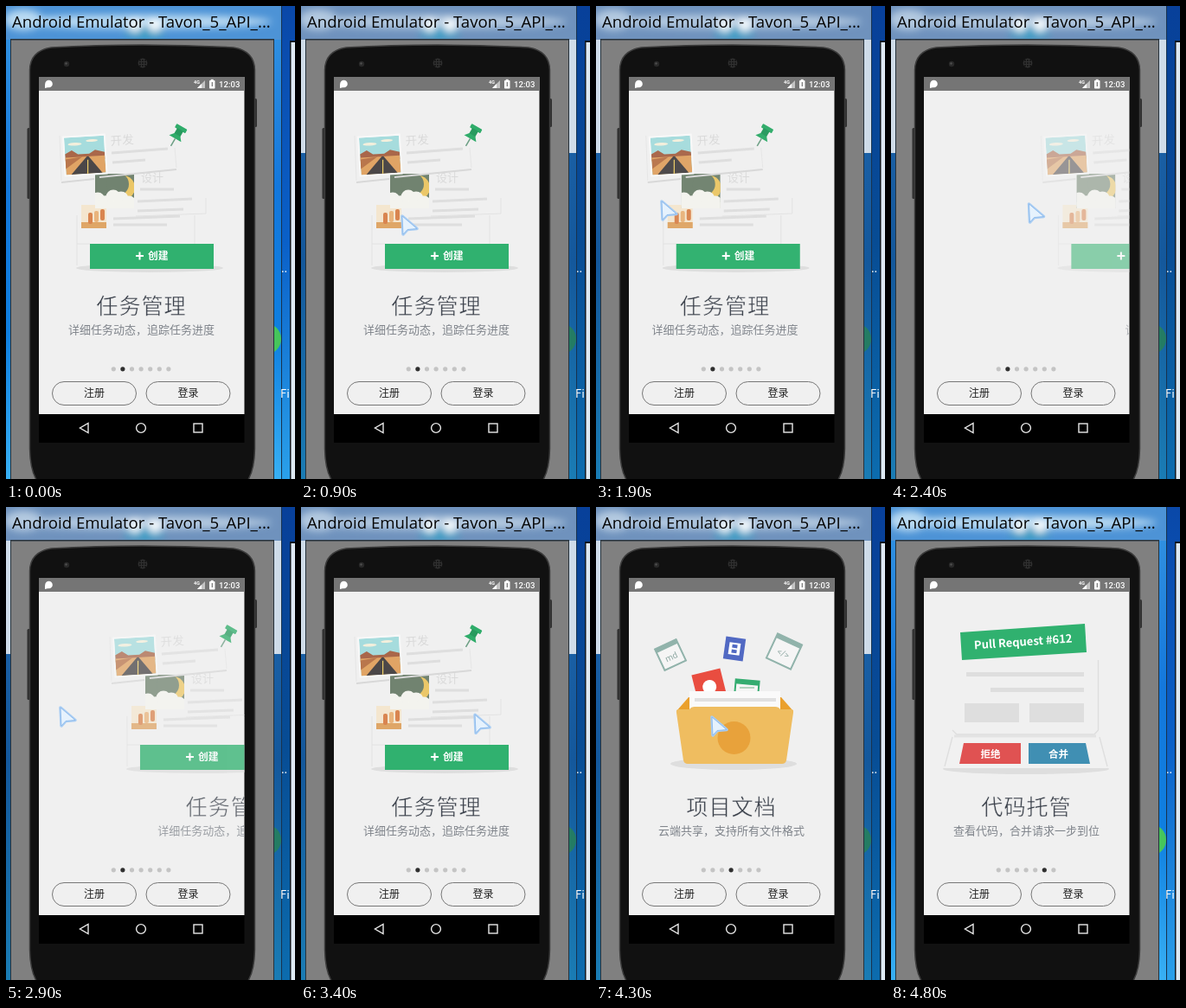
An HTML page for the animation above (5400 ms loop, 334x547 px).

```html
<!DOCTYPE html>
<html lang="zh-CN">
<head>
<meta charset="utf-8">
<title>Emulator onboarding</title>
<style>
html, body { margin: 0; width: 100%; height: 100%; overflow: hidden; background: #0b57a8; }
svg { display: block; width: 334px; height: 547px; }
text { font-family: "Noto Sans CJK SC", "Noto Sans CJK", "Noto Sans", sans-serif; }
.bar { font: 18.6px "Open Sans", sans-serif; }
.ui { font-family: Roboto, sans-serif; }
.title { font-size: 25.2px; letter-spacing: .9px; fill: #3c424c; stroke: #f0f0f0; stroke-width: .5px; }
.sub { font-size: 13px; fill: #7f848b; }
.mid { text-anchor: middle; }
.strong { font-weight: 700; fill: #fff; }
</style>
</head>
<body>
<svg id="stage" viewBox="0 0 334 547" xmlns="http://www.w3.org/2000/svg"></svg>
<script>
const LOOP = 5400, STEP = 100, WIDTH = 238, TEXT_SHIFT = 424;
const PAPER = '#f0f0f0', LINE = '#dedede', GREEN = '#30b16f';

// markup helpers
const rect = (x, y, w, h, fill, more = '') => `<rect x="${x}" y="${y}" width="${w}" height="${h}" fill="${fill}" ${more}/>`;
const circle = (x, y, r, fill, more = '') => `<circle cx="${x}" cy="${y}" r="${r}" fill="${fill}" ${more}/>`;
const oval = (x, y, rx, ry, fill, more = '') => `<ellipse cx="${x}" cy="${y}" rx="${rx}" ry="${ry}" fill="${fill}" ${more}/>`;
const poly = (pts, fill, more = '') => `<polygon points="${pts}" fill="${fill}" ${more}/>`;
const shape = (d, fill) => `<path d="${d}" fill="${fill}"/>`;
const line = (d, stroke, w = 1) => `<path d="${d}" stroke="${stroke}" stroke-width="${w}" fill="none"/>`;
const text = (x, y, s, more) => `<text x="${x}" y="${y}" ${more}>${s}</text>`;
const place = (x, y, turn, body) => `<g transform="translate(${x} ${y}) rotate(${turn})">${body}</g>`;
const each = (list, draw) => list.map(draw).join('');
const clip = (id, w, h, body) => `<clipPath id="${id}"><rect width="${w}" height="${h}"/></clipPath><g clip-path="url(#${id})">${body}</g>`;
const fade = (id, ...colors) => `<linearGradient id="${id}" x2="0" y2="1">` +
  each(colors, (c, i) => `<stop offset="${i / (colors.length - 1)}" stop-color="${c}"/>`) + '</linearGradient>';

const defs = `<defs>
  ${fade('sideLit', '#2f8fe0', '#1478dc', '#0f7fe0', '#38b0f4')}
  ${fade('sideDim', '#1f66ad', '#14589c', '#1a7cb4')}
  ${fade('backLit', '#0a48a8', '#0a60c8', '#2aa0ea')}
  ${fade('backDim', '#08409a', '#074c94', '#0c6cae')}
  <filter id="soft" x="-20%" y="-100%" width="140%" height="300%"><feGaussianBlur stdDeviation="4"/></filter>
  <clipPath id="screen"><rect x="38" y="98" width="237.5" height="374"/></clipPath>
</defs>`;

function desktop(mode, base, haze, disc) {
  const glow = oval(157, 18, 150, 8, haze) + oval(20, 16, 22, 12, haze) +
    oval(160, 31, 24, 8, '#3b9cc4') + each([149, 172], x => circle(x, 22, 8, '#f2f8fb'));
  return `<g id="wall${mode}">` +
    rect(0, 0, 334, 547, `url(#back${mode})`) + rect(0, 39, 318, 508, `url(#side${mode})`) +
    (mode === 'Dim' ? rect(0, 39, 318, 131, '#cfdce9') : '') +
    circle(300, 385, 18, disc) + rect(0, 0, 318, 39, base) + `<g filter="url(#soft)">${glow}</g></g>`;
}

function frame() {
  return line('M318.5 0V547', '#17324e') + rect(328, 40, 6, 507, '#101820') + rect(329.5, 42, 4.5, 505, '#dfeaf3') +
    text(317, 453, 'Fi', 'font-size="13" fill="#fff"') + text(318, 308, '..', 'font-size="13" fill="#fff"') +
    text(7, 25, 'Android Emulator - Tavon_5_API_...', 'class="bar" fill="#050505"') +
    rect(5, 38, 305, 509, '#26323c') + rect(6, 39.5, 303, 508, '#808080');
}

function phone() {
  const grid = [-3, 0, 3], body = 'M27.5 512V74Q28 52 52 48Q104 45 157.500 45Q211 45 263 48Q287 52 287.500 74V512Q287 540 277 552H38Q28 540 27.500 512Z';
  const hollow = 'none" stroke="#e8e8e8" stroke-width="1.4';
  return rect(24.5, 141, 4, 82, '#303030', 'rx="1.5"') + rect(286, 107, 4, 33, '#303030', 'rx="1.5"') +
    shape(body, '#111') + line(body, '#3c3c3c', 1.5) +
    circle(70, 67, 3.2, '#292929') + circle(69.5, 66.5, 1.2, '#505050') + circle(158, 66, 5.4, '#303030') +
    each(grid, dx => each(grid, dy => circle(158 + dx, 66 + dy, .9, '#111'))) +
    rect(38, 82, 237.5, 423, '#000') + rect(38, 82, 237.5, 390, PAPER) + rect(38, 82, 237.5, 16, '#757575') +
    circle(49.5, 90, 4.3, '#fff') + poly('45,90 49,94 45,95', '#fff') +
    text(217, 90, '4G', 'class="ui strong" font-size="5.5"') +
    poly('221,95 230,95 230,86', '#c3c3c3') + poly('221,95 226,95 226,90', '#fff') +
    rect(235, 86, 6.5, 9.5, '#fff', 'rx=".8"') + rect(236.7, 84.8, 3, 2, '#fff') + rect(237.7, 88, 1.2, 5, '#757575') +
    text(246, 94, '12:03', 'class="ui" font-size="9.6" font-weight="500" fill="#fff"') +
    poly('95,482.5 95,493.5 85.5,488', hollow) + circle(156, 488, 5.4, hollow) + rect(217, 483, 10, 10, hollow);
}

function controls() {
  const pill = (x, s) => rect(x, 434.5, 97, 27, PAPER, 'rx="13.5" stroke="#777"') +
    text(x + 48.5, 452.3, s, 'class="mid" font-size="12" fill="#222"');
  return each([...Array(7).keys()], i => circle(124.3 + 10.6 * i, 419.8, 2.6, '#c4c4c4', 'class="dot"')) +
    pill(53.5, '注册') + pill(162, '登录');
}

function avatar(x, y, scale) {
  return `<g transform="translate(${x} ${y}) scale(${scale})">` + circle(0, 0, 11, '#49aada') +
    shape('M-7 8Q-4 5 0 5Q4 5 7 8Q0 14 -7 8Z', '#f6f6f6') + oval(0, 1, 6, 7, '#f5d9bf') +
    shape('M-7 0Q-9 -9 0 -9Q9 -9 7 0Q5 -4 1 -4Q-5 -3 -7 0Z', '#17222b') +
    each([-3, 3], dx => circle(dx, 1.3, 2.3, '#fff', 'stroke="#1b242b" stroke-width="1.1"')) + line('M-1.5 5.5H1.5', '#b46b55', .8) + '</g>';
}

const ground = (x, y, rx, ry) => oval(x, y, rx, ry, LINE);

function tasks() {
  const road = rect(0, 0, 46, 43, '#a6dcdd') + oval(12, 8, 8, 1.8, '#f3efdc') + oval(32, 5, 7, 1.5, '#f3efdc') +
    poly('0,19 8,15 15,20 28,20 35,16 46,19 46,27 0,27', '#a9674a') + rect(0, 23, 46, 20, '#e0a465') +
    poly('0,25 20,23 0,36', '#b9764c') + poly('25,23 27,23 42,43 6,43', '#4b4748') + line('M26 27L25 43', '#f0cf68', 1.2);
  const night = rect(0, 0, 45, 40, '#718370') + circle(32, 16, 14, '#ebc768') + circle(26, 12, 13, '#718370') +
    each([0, 1, 2, 3, 4], i => circle(3 + 9 * i, 30 + 4 * Math.sin(i * 2), 8.5, '#f3f3ee')) + rect(0, 33, 45, 7, '#f3f3ee');
  const autumn = rect(0, 0, 29, 27, '#f4e6cf') + rect(0, 20, 29, 7, '#dfa667') +
    each([0, 1, 2], i => rect(8 + 7 * i, 9 - i * 2, 5, 13, i % 2 ? '#e9b47c' : '#d98550', 'rx="2"'));
  const pin = rect(-7, -11, 14, 5, '#2fac6a', 'rx="1"') + rect(-4, -7, 8, 9, '#279a5e') + poly('-4,0 4,0 8,5 -8,5', '#2fac6a') + line('M0 5V15', '#6b9e83', 1.5);
  return ground(166, 303, 85, 5) + line('M82 242V300M82 275H97M218 242V275M231 222V240L150 243', '#e2e2e2') +
    place(87, 230, 0, autumn) + line('M124 246L201 243M124 253H186', LINE, 3) +
    place(103, 194, 0, clip('night', 45, 40, night)) + text(156, 203, '设计', 'font-size="13" fill="#dadada"') +
    line('M155 212H194M152 226L215 223M152 237L205 235', LINE, 3) +
    line('M62 150L64 202M195 164L197 187', '#e6e6e6') + line('M64 204L102 200M108 198L197 189', '#d8d8d8', 2) +
    place(67, 152.5, -3.5, rect(-2, -2, 50, 47, '#f8f8f8') + clip('photo', 46, 43, road)) +
    place(121, 161, -4, text(0, 0, '开发', 'font-size="13.5" fill="#d9d9d9"')) +
    line('M122 170L187 165M123 181L161 178', LINE, 3) + place(198, 149, 30, pin) +
    rect(97, 275, 143, 29, GREEN) + line('M150 289H159M154.5 284.5V293.5', '#fff', 2) +
    text(164, 293.4, '创建', 'class="strong" font-size="11.8"');
}

function detail() {
  const bar = (y, h) => rect(106, y, 121, h, LINE);
  return ground(156.5, 305, 94, 6) + rect(74, 171, 165, 133, PAPER) +
    line('M239 176V304', LINE) + line('M88 177V305', '#d4d4d4', 1.5) +
    rect(72, 133, 166, 38, GREEN) + rect(81.2, 145.5, 13.5, 13, 'none', 'rx="2.5" stroke="#fff" stroke-width="1.8"') +
    avatar(113, 152, 1) + text(129.5, 157, '!!!', 'class="ui strong" font-size="15" letter-spacing=".5"') +
    rect(152, 148, 76, 8, '#b9e4cd') + bar(192, 7) + bar(221, 7) + bar(244, 21) + poly('102,254 106,249 106,259', LINE) + bar(281, 6) +
    each(['#cbcbcb', '#e3bd5c', PAPER, '#d76463'], (c, i) => circle(88, 194.5 + 29.8 * i, 9.6, c)) +
    line('M83.5 195H92.5M88 190.5V199.5', '#f3f3f3', 2.3) +
    rect(84, 219.5, 8, 7.5, '#fff4d9', 'rx="1"') + rect(85.5, 222.5, 5, 3, '#e3bd5c') +
    avatar(88, 254, .86) + rect(86.8, 279.5, 2.4, 5.5, '#fff') + circle(88, 287.5, 1.3, '#fff');
}

function files() {
  const sheet = (x, y, turn, size, color, label) => {
    const h = size / 2;
    return place(x, y, turn, rect(-h, -h, size, size, '#f5f5f5', `stroke="${color}" stroke-width="2"`) + rect(-h, -h, size, 5, color) +
      text(0, 6, label, 'class="mid ui" font-size="10" fill="#91aaa5"'));
  };
  const film = rect(-11.5, -13, 23, 26, '#5169c3') + rect(-6.5, -7, 13, 14, '#fff') + each([-5, 1], y => rect(-3, y, 6, 4, '#5169c3'));
  return ground(159, 297, 73, 7) + sheet(86, 171, -25, 27, '#91b3ab', 'md') + sheet(217.5, 167, 25, 31, '#91b3ab', '&lt;/&gt;') +
    place(160, 164, 8, film) + place(131, 207, -14, rect(-17, -17, 34, 38, '#e94d40') + circle(0, 1, 8, '#fff')) +
    sheet(174, 214, 5, 27, '#34ac70', '') + line('M166 209H183', '#9bc9ae', 1.5) +
    poly('93,236 107,220 214,220 228,236 214,243 107,243', '#eaa02d') + rect(108, 213, 105, 22, '#fafafa') + rect(114, 221, 94, 4, '#e0e0e0') +
    shape('M95 234H108Q110 231 114 231H207Q211 231 213 234H226Q228.5 234 228 238L220 293Q219 297 215 297H106Q102 297 101 293L93 238Q92.5 234 95 234Z', '#efbd60') +
    circle(159.5, 267, 19, '#e8a23b');
}

function review() {
  const label = (x, y, turn, size, s) => place(x, y, turn, text(0, 0, s, `class="mid strong" font-size="${size}"`));
  return ground(156, 303, 96, 6) + poly('73,264 239,264 250,302 62,302', '#f1f1f1') +
    line('M239.5 177V258L235 263H76L71 258M71 266L62 300M241 266L250 300', LINE, 1.3) + line('M73 265H237', '#e3e3e3', 3) +
    poly('80,145 224,135 226,168 82,177', GREEN) + label(153, 160.5, -4, 13, 'Pull Request #612') +
    rect(87, 191, 136, 5, LINE) + rect(115, 209, 108, 5, LINE) + each([85, 160], x => rect(x, 227, 63, 22, LINE)) +
    poly('84,273 150,273 150,297 79,297', '#e05252') + poly('159,273 225,273 230,297 159,297', '#408fb3') +
    label(115, 289.5, 0, 11.5, '拒绝') + label(193.5, 289.5, 0, 11.5, '合并');
}

const pages = [
  [1, tasks, '任务管理', '详细任务动态，追踪任务进度'],
  [2, detail, '任务管理', '详细任务动态，追踪任务进度'],
  [3, files, '项目文档', '云端共享，支持所有文件格式'],
  [5, review, '代码托管', '查看代码，合并请求一步到位']
];
const arrow = 'M0 0L1 21L6 15.5L17 14.5Z';
const cursor = `<g id="cursor" stroke-linejoin="round"><path d="${arrow}" fill="#d9eafa" stroke="#a9cdf3" stroke-width="3.5"/>` +
  `<path d="${arrow}" fill="#e6f2fd" stroke="#86b5ea" stroke-width=".8"/></g>`;

document.getElementById('stage').innerHTML = defs +
  desktop('Lit', '#4d93d6', '#b9daf2', '#46c55b') + desktop('Dim', '#6f92bd', '#b3c9e0', '#247c63') + frame() + phone() +
  '<g clip-path="url(#screen)">' + each(pages, ([n, draw, title, sub]) =>
    `<g id="page${n}"><g class="art">${draw()}</g><g class="words">${text(156.5, 356, title, 'class="title mid"') + text(156.5, 379, sub, 'class="sub mid"')}</g></g>`) +
  '</g>' + controls() + cursor;

// each swipe: start, end, page reached
const swipes = [[1000, 1500, 2], [1500, 2000, 1], [2000, 2600, .5], [2800, 3200, 1], [3400, 3800, 2], [3900, 4300, 3], [4400, 4800, 5]];
// pointer rests: time, x, y
const rests = [[100, 328, 530], [900, 117, 243], [1900, 76, 226], [2900, 63, 232], [3800, 152, 247], [4300, 134, 243], [4800, 340, 540]];

const clamp = u => Math.max(0, Math.min(1, u));
const settle = u => 1 - Math.pow(1 - u, 2.5);

const pageAt = t => swipes.reduce((pos, [from, to, goal]) => pos + (goal - pos) * settle(clamp((t - from) / (to - from))), 1);

// between drags the pointer swings out to the right and back
function pointerAt(t) {
  const i = Math.max(1, rests.findIndex(r => r[0] > t));
  const [t0, x0, y0] = rests[i - 1], [t1, x1, y1] = rests[i];
  const u = clamp((t - t0) / (t1 - t0));
  const swing = t > 900 && t < 4300 ? 90 * Math.sin(Math.PI * u) : 0;
  return [x0 + (x1 - x0) * u + swing, y0 + (y1 - y0) * u];
}

const $ = id => document.getElementById(id);
const show = (el, on) => el.setAttribute('visibility', on ? 'visible' : 'hidden');
const move = (el, x, y = 0) => el.setAttribute('transform', `translate(${x} ${y})`);
const dots = document.querySelectorAll('.dot');
const views = pages.map(([n]) => ({ n, el: $('page' + n) }));

function render(ms) {
  const t = Math.floor(ms % LOOP / STEP) * STEP;
  const pos = pageAt(t);
  for (const { n, el } of views) {
    const d = n - pos, alpha = clamp(1 - Math.abs(d));
    show(el, alpha > 0);
    el.setAttribute('opacity', alpha);
    move(el.querySelector('.art'), d * WIDTH);
    move(el.querySelector('.words'), d * TEXT_SHIFT);
  }
  dots.forEach((dot, i) => dot.setAttribute('fill', i === Math.round(pos) ? '#2f2f2f' : '#c4c4c4'));
  show($('wallDim'), t >= 900 && t < 4700);
  show($('cursor'), t >= 100 && t < 4800);
  move($('cursor'), ...pointerAt(t));
}

const start = performance.now();
function tick(now) {
  render(Math.max(0, now - start));
  requestAnimationFrame(tick);
}
render(0);
requestAnimationFrame(tick);
</script>
</body>
</html>
```
